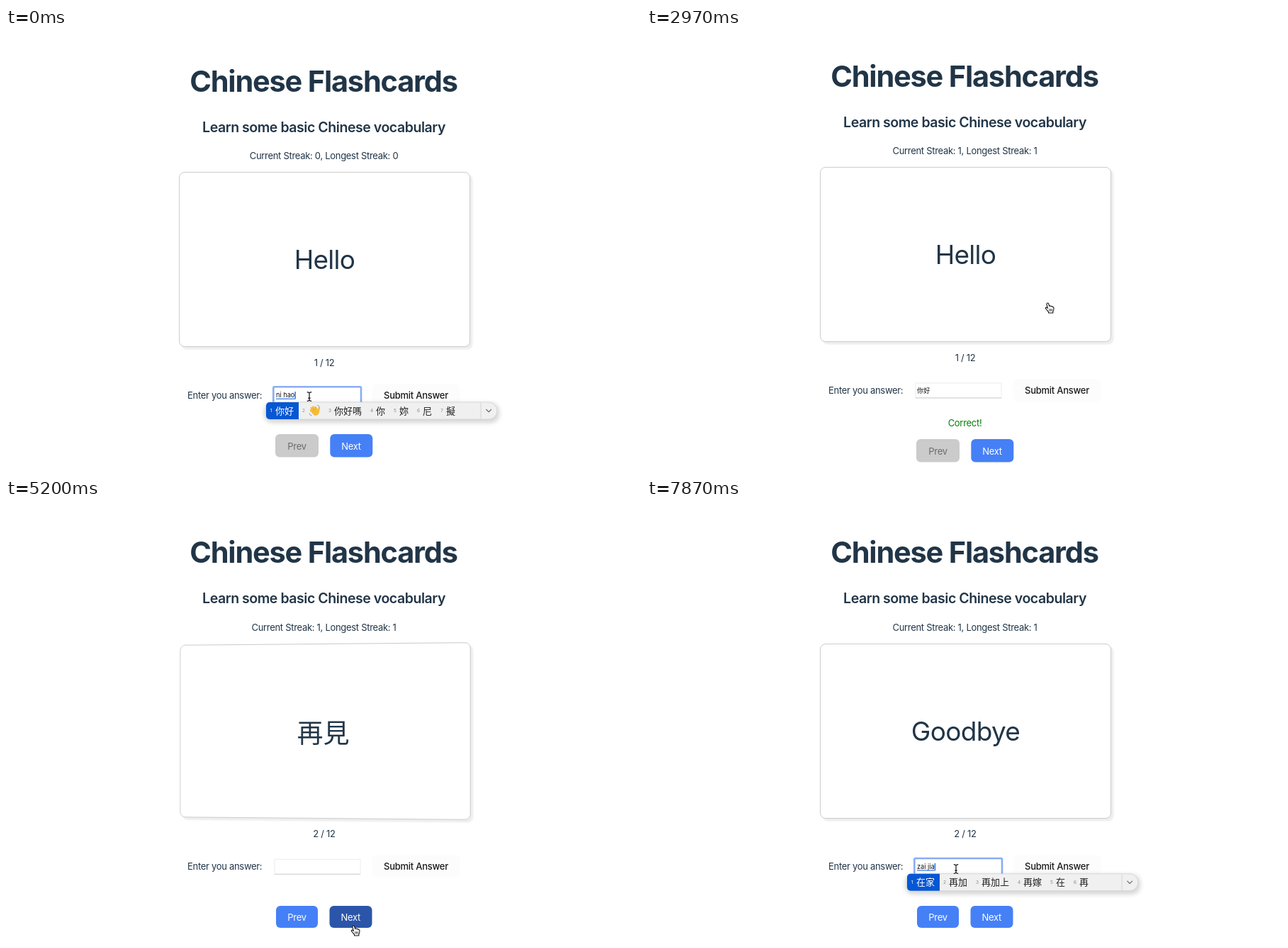
Recreate the animation shown at these times as an HTML page. Size 896 by 625 pixels, loop 8000 ms.

```html
<!DOCTYPE html>
<html lang="zh-Hant">
<head>
<meta charset="utf-8">
<title>Flashcards</title>
<style>
  html, body { margin: 0; width: 100%; height: 100%; overflow: hidden; background: #fff; }
  body { font-family: Inter, "Noto Sans CJK TC", "Noto Sans CJK SC", "Noto Sans CJK JP", sans-serif; color: #213547; }
  #stage { position: relative; width: 896px; height: 625px; overflow: hidden; }
  #scene { position: absolute; left: 243px; top: 203px; width: 411px; height: 247px; perspective: 840px; }
  #card { position: absolute; inset: 0; transform-style: preserve-3d; }
  .face {
    position: absolute; inset: 0; box-sizing: border-box; display: flex; align-items: center; justify-content: center;
    background: #fff; border: 1px solid #ccc; border-radius: 8px; box-shadow: 3.5px 3.5px 2px rgba(0, 0, 0, .07);
    font-size: 37px; backface-visibility: hidden;
  }
  #front { transform: translateX(1px); letter-spacing: -.7px; }
  #back { transform: rotateY(180deg) translateX(-1px); }
  svg { position: absolute; left: 0; top: 0; }
  text { fill: #213547; font-size: 13px; letter-spacing: -.3px; white-space: pre; }
  .mid { text-anchor: middle; }
  .white { fill: #fff; }
</style>
</head>
<body>
<div id="stage">
  <div id="scene"><div id="card"><div id="front" class="face"></div><div id="back" class="face"></div></div></div>
  <svg width="896" height="625" viewBox="0 0 896 625">
    <defs>
      <filter id="soft" x="-10%" y="-80%" width="120%" height="260%"><feGaussianBlur stdDeviation="3"/></filter>
    </defs>
    <g id="page">
      <text class="mid" x="448" y="89.5" style="font-size:41.5px;font-weight:700;letter-spacing:-1.2px">Chinese Flashcards</text>
      <text class="mid" x="448.5" y="146.5" style="font-size:19.5px;font-weight:600;letter-spacing:-.45px">Learn some basic Chinese vocabulary</text>
      <text class="mid" x="448.5" y="185" id="streak"></text>
      <text class="mid" x="449" y="476.5" id="count"></text>
      <text x="256" y="522.5">Enter you answer:</text>
      <rect id="submit" x="516.5" y="502" width="124" height="31.5" rx="6.5"/>
      <text class="mid" x="578.5" y="522.5" style="font-weight:500;letter-spacing:-.25px;fill:#1a1a1a">Submit Answer</text>
      <rect x="379" y="507.5" width="121" height="21" fill="#fff" stroke="#ececec"/>
      <path d="M379 528.5H500" stroke="#cfcfcf"/>
      <rect id="ring" x="377.3" y="506.2" width="123.7" height="24" rx="1.5" fill="#fff" stroke="#8aacf4" stroke-width="2.6"/>
      <text id="typed" x="381" y="521.3" style="font-size:9.2px;letter-spacing:0;fill:#111"></text>
      <path id="underline" stroke="#2f78dc" stroke-width="1.2"/>
      <rect id="caret" y="513" width="1.5" height="10.5" fill="#1f7af0"/>
      <g id="ime">
        <rect x="364" y="529" width="332" height="28" rx="12" fill="#000" opacity=".16" filter="url(#soft)"/>
        <path d="M372 528H681a12 12 0 0 1 0 24H372a5 5 0 0 1-5-5V533a5 5 0 0 1 5-5Z" fill="#f0f0f0" stroke="#cdcdcd" stroke-width=".7"/>
        <path id="pick" fill="#0657d3"/>
        <g id="words"></g>
        <path d="M670 528.5V551.5" stroke="#d6d6d6"/>
        <path d="M677.5 538L681.2 541.7L684.9 538" fill="none" stroke="#666" stroke-width="1.1"/>
      </g>
    </g>
    <text class="mid" id="correct" x="448.5" y="562" style="fill:#008000">Correct!</text>
    <rect id="prev" rx="6"/>
    <text class="mid" id="prevText" x="410.5">Prev</text>
    <rect id="next" rx="6"/>
    <text class="mid white" id="nextText" x="487">Next</text>
    <g id="cursor">
      <g id="beam" fill="none">
        <path d="M-3.2-6.3Q0-6.3 0-4.5V4.5Q0 6.3-3.2 6.3M3.2-6.3Q0-6.3 0-4.5M0 4.5Q0 6.3 3.2 6.3M-1.7 2.2H1.7" stroke="#fff" stroke-width="2.4"/>
        <path d="M-3.2-6.3Q0-6.3 0-4.5V4.5Q0 6.3-3.2 6.3M3.2-6.3Q0-6.3 0-4.5M0 4.5Q0 6.3 3.2 6.3M-1.7 2.2H1.7" stroke="#111" stroke-width="1.2"/>
      </g>
      <path id="arrow" d="M-2-7V6L1 3.2L3 8L5 7.1L3 2.5H7Z" fill="#111" stroke="#fff" stroke-width=".9"/>
      <g id="hand" stroke="#111" stroke-width="1.1" stroke-linejoin="round" stroke-linecap="round">
        <path d="M-3.6-6.6C-2.8-7.4-1.7-7-1.4-6L-.4-2.6C.4-3.4 1.7-3.2 2-2.2C2.9-2.8 4-2.4 4.2-1.4C5.2-1.7 6-1 6 .2C6 2.4 5.6 3.6 4.8 5V7H-1.4V5.6C-2.8 4.2-3.6 2.6-5.4 .9C-6.2-.1-5-1.3-3.8-.6L-2.6.3L-4.1-5.2C-4.3-5.8-4.1-6.2-3.6-6.6Z" fill="#fff"/>
        <path d="M-.3 1.6V4.2M1.5 1.6V4.2M3.3 1.6V4.2" stroke-width=".8"/>
      </g>
    </g>
  </svg>
</div>
<script>
const LOOP = 8000, TICK = 148.15;
const $ = id => document.getElementById(id);
const set = (id, attrs) => { for (const k in attrs) $(id).setAttribute(k, attrs[k]); };
const show = (id, on) => set(id, { display: on ? 'inline' : 'none' });
const label = (id, s) => { if ($(id).textContent !== s) $(id).textContent = s; };

// tick, x, y, pointer shape
const PATH = [
  [0, 428, 520, 'beam'], [5, 428, 520, 'beam'], [8, 482, 521, 'beam'], [9, 508, 523, 'arrow'],
  [10, 540, 524, 'hand'], [13, 606, 527, 'hand'], [14, 610, 527, 'hand'], [17, 610, 527, 'hand'],
  [18, 604, 510, 'hand'], [19, 580, 425, 'hand'], [20, 568, 395, 'hand'], [30, 568, 395, 'hand'],
  [31, 560, 420, 'hand'], [32, 535, 500, 'arrow'], [33, 503, 593, 'hand'], [34, 493, 609, 'hand'],
  [36, 493, 609, 'hand'], [38, 488, 594, 'hand'], [39, 482, 582, 'hand'], [40, 472, 560, 'arrow'],
  [42, 448, 536, 'arrow'], [43, 440, 525, 'beam'], [45, 436, 522, 'beam'], [54, 436, 522, 'beam']
];

// tick, typed text, candidates (empty when the list is closed)
const ENTRY = [
  [0, 'ni hao', '你好 👋 你好嗎 你 妳 尼 擬'], [4, '你好', ''], [35, '', ''],
  [48, 'z', '在 這 中 做 最 再 只 著'], [49, 'za', '在 雜 砸 咋 紮 匝 咱 扎'], [50, 'zai', '在 再 載 災 仔 宰 栽 哉'],
  [52, 'zai ji', '在即 再 在 載 災 仔 宰'], [53, 'zai jia', '在家 再加 再加上 再嫁 在 再']
];

function pointer(tick) {
  const i = PATH.findLastIndex(p => p[0] <= tick);
  const a = PATH[i], b = PATH[i + 1] || a;
  const f = b === a ? 0 : (tick - a[0]) / (b[0] - a[0]);
  return { x: a[1] + (b[1] - a[1]) * f, y: a[2] + (b[2] - a[2]) * f, shape: a[3] };
}

// CSS "ease": cubic-bezier(.25, .1, .25, 1)
function ease(x) {
  if (x <= 0) return 0;
  if (x >= 1) return 1;
  const curve = (p, q, u) => 3 * p * u * (1 - u) ** 2 + 3 * q * u * u * (1 - u) + u ** 3;
  let lo = 0, hi = 1;
  for (let i = 0; i < 24; i++) {
    const m = (lo + hi) / 2;
    if (curve(.25, .25, m) < x) lo = m; else hi = m;
  }
  return curve(.1, 1, lo);
}

function waveHand(x) {
  return `<g transform="translate(${x + 9.5} 540) rotate(-38)" stroke="#f6bd3a" stroke-width="2.7" stroke-linecap="round">
    <ellipse cx="0" cy="2.6" rx="4.8" ry="4.6" fill="#f6bd3a" stroke="none"/>
    <path d="M-3.3 2L-4-4M-1.1 0L-1.3-6M1.2 0L1.5-5.6M3.3 2L4-3.4M3.5 4L7.2 1"/>
    <path d="M-2.2-3V.5M.1-4V0M2.4-3V.5" stroke="#d9962a" stroke-width=".5"/></g>
    <path d="M${x + 13} 532q3 .6 3.6 3.6M${x + 2} 543.5q.6 3 3.6 3.6" fill="none" stroke="#6aa7d8" stroke-width="1"/>`;
}

let shown = '';
function drawWords(list) {
  if (list === shown) return;
  shown = list;
  let x = 367, out = '';
  list.split(' ').forEach((word, i) => {
    const emoji = word === '👋';
    const width = 20 + (emoji ? 17 : 13 * word.length);
    out += `<text class="mid" x="${x + 7}" y="542.3" style="font-size:6.5px;letter-spacing:0;fill:${i ? '#888' : '#fff'}">${i + 1}</text>`;
    out += emoji ? waveHand(x + 13)
      : `<text x="${x + 13}" y="544.5" style="letter-spacing:0;font-weight:${i ? 400 : 500};fill:${i ? '#222' : '#fff'}">${word}</text>`;
    if (!i) set('pick', { d: `M372 528H${x + width}V552H372a5 5 0 0 1-5-5V533a5 5 0 0 1 5-5Z` });
    x += width;
  });
  $('words').innerHTML = out;
}

function draw(ms) {
  const tick = Math.floor((ms + 5) / TICK), t = tick * TICK;
  const correct = tick >= 16 && tick < 35, second = tick >= 35;
  const dy = correct ? -6.6 : second ? .8 : 0;
  const p = pointer(tick);

  set('page', { transform: `translate(0 ${dy})` });
  $('scene').style.top = 203 + dy + 'px';
  const n = tick >= 16 ? 1 : 0;
  label('streak', `Current Streak: ${n}, Longest Streak: ${n}`);
  label('count', `${second ? 2 : 1} / 12`);
  label('front', second ? 'Goodbye' : 'Hello');
  label('back', second ? '再見' : '你好');
  const turn = second ? 1 - ease((t - 5165) / 600) : ease((t - 3139) / 560);
  $('card').style.transform = `rotateY(${180 * turn}deg)`;

  const entry = ENTRY.findLast(e => e[0] <= tick);
  const [, typed, list] = entry;
  const focus = tick < 15 || tick >= 44;
  label('typed', typed);
  show('ring', focus);
  const end = 381 + (typed ? $('typed').getComputedTextLength() : 0);
  show('underline', list);
  set('underline', { d: `M381 523.2H${end}` });
  show('caret', focus && !(tick >= 1 && tick < 4));
  set('caret', { x: end });
  show('ime', list);
  if (list) drawWords(list);

  const onSubmit = p.shape === 'hand' && p.x > 516 && p.y > 495;
  set('submit', { fill: onSubmit ? '#fff' : '#fcfcfc', stroke: onSubmit ? '#646cff' : 'none' });

  show('correct', correct);
  const top = second ? 574 : correct ? 580 : 573;
  const height = second ? 31 : 32.5, base = top + (second ? 20.5 : 21.5);
  set('prev', { x: second ? 381 : 380, y: top, width: second ? 59 : 61, height, fill: second ? '#4680f6' : '#cbcbcb' });
  set('prevText', { y: base, style: `fill:${second ? '#fff' : '#6c6c6c'}` });
  const onNext = p.shape === 'hand' && p.y > 570;
  set('next', { x: second ? 456.5 : 457.3, y: top, width: 60, height, fill: onNext ? '#2b55a9' : '#4680f6' });
  set('nextText', { x: second ? 486.3 : 487, y: base });

  set('cursor', { transform: `translate(${p.x} ${p.y})` });
  for (const s of ['beam', 'arrow', 'hand']) show(s, s === p.shape);
}

const start = performance.now();
function frame() {
  draw((performance.now() - start) % LOOP);
  requestAnimationFrame(frame);
}
frame();
</script>
</body>
</html>
```
